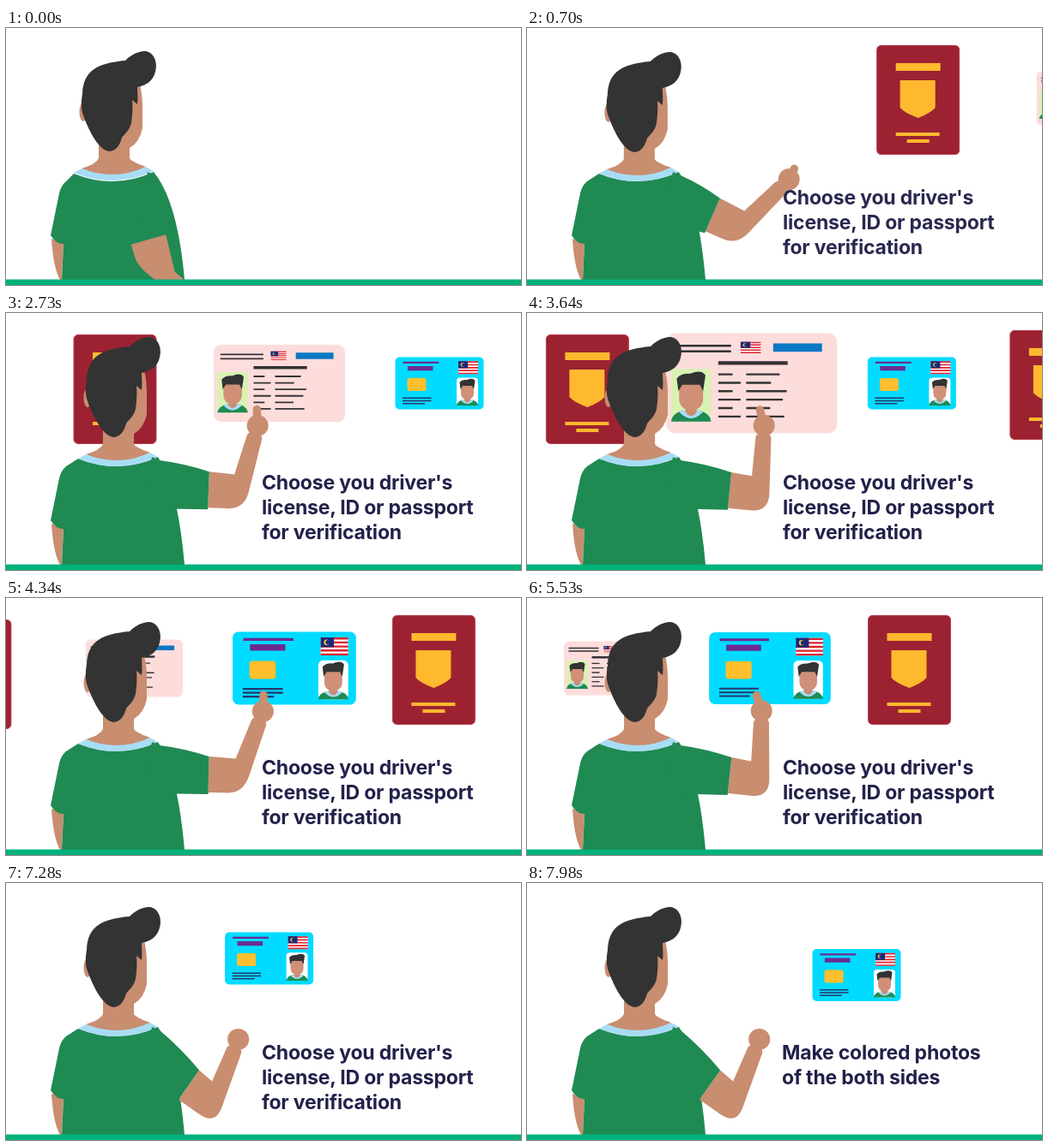
These frames come from a looping animation (600x300 px, 8 s). An HTML page:

```html
<!DOCTYPE html>
<html lang="en">
<head>
<meta charset="utf-8">
<style>
  html, body { margin: 0; width: 100%; height: 100%; overflow: hidden; background: #fff; }
  svg { display: block; width: 600px; height: 300px; }
  text { font: 700 23px Inter, "Open Sans", sans-serif; letter-spacing: -.2px; fill: #22214a; }
</style>
</head>
<body>
<svg viewBox="0 0 600 300">
  <defs>
    <g id="flag">
      <path fill="#fff" d="M0 0H23V15H0Z"/>
      <path stroke="#e0202f" stroke-width="23" stroke-dasharray="1.67" d="M11.5 0V15"/>
      <path fill="#1a2a78" d="M0 0H11V8H0Z"/>
      <circle cx="5" cy="4" r="2.3" fill="#ffd23c"/>
      <circle cx="6" cy="4" r="1.9" fill="#1a2a78"/>
    </g>
    <g id="avatar">
      <path fill="#208a53" d="M0 33Q1 27 9 26H16Q24 27 25 33Z"/>
      <path fill="#a8dcf5" d="M5 27L9 25.5H16L20 27Q12.5 35 5 27Z"/>
      <path fill="#c98d70" d="M9 21H16V27Q12.5 32 9 27Z"/>
      <rect x="5" y="7" width="15" height="19" rx="7" fill="#d28f78"/>
      <path fill="#333" d="M4.5 14L3.5 6Q6 2.500 12 3Q19 0 21.500 4L20 14L18 10H7Z"/>
    </g>
    <g id="passport">
      <rect x="-48" y="-63.500" width="96" height="127" rx="5" fill="#9c2232" stroke="#b5404c"/>
      <path fill="#ffb92e" d="M-26-43H26V-34H-26ZM-21-23H20V9Q15 15 0 21Q-16 15-21 9ZM-26 38H25V42H-26ZM-13 46H13V50H-13Z"/>
    </g>
    <g id="license">
      <rect x="-53.500" y="-31.500" width="107" height="63" rx="6" fill="#fddcdc"/>
      <path stroke="#333" stroke-width="1.300" d="M-48-23.500H-13M-48-20H-13"/>
      <path stroke="#333" stroke-width="2.400" d="M-21-12.700H22.500"/>
      <path id="rows" stroke="#333" stroke-width="1.300"/>
      <path fill="#0a78c2" d="M13.400-25H44V-19.700H13.400Z"/>
      <use href="#flag" transform="translate(-7 -26) scale(.55 .48)"/>
      <path fill="#d9f2b4" d="M-50.500-9H-25.500V24H-50.500Z"/>
      <use href="#avatar" x="-50.500" y="-9"/>
    </g>
    <g id="idcard">
      <rect x="-51.500" y="-30.500" width="103" height="61" rx="5" fill="#00dbff"/>
      <path fill="#6b2c91" d="M-42.500-25.200H-.7V-23H-42.500ZM-37-20H-7.500V-14.700H-37Z"/>
      <rect x="-37.500" y="-6" width="22" height="15" rx="2.500" fill="#ffbf2e"/>
      <path stroke="#26376b" stroke-width="1.500" d="M-43 17.300H-9.500M-43 20.500H-9.500M-43 23.700H-17"/>
      <use href="#flag" x="22" y="-25.700"/>
      <rect x="20" y="-6.600" width="25" height="32.500" rx="4" fill="#fff"/>
      <use href="#avatar" x="20" y="-7"/>
    </g>
  </defs>

  <use id="passport1" href="#passport"/>
  <use id="license1" href="#license"/>
  <use id="id1" href="#idcard"/>
  <use id="passport2" href="#passport"/>

  <path fill="#c98d70" d="M53 246L67 250L65 294H63Q55 280 53 246Z"/>
  <path id="torso" fill="#208a53"/>
  <g id="head">
    <path fill="#c98d70" d="M113 130V153Q110 160 93 165Q131 182 168 163Q151 157 149 153V130Z"/>
    <path fill="#a8dcf5" d="M84 170L93 165Q131 180 168 163L177 168Q131 189 84 170Z"/>
    <ellipse cx="95" cy="99" rx="4.500" ry="11" fill="#c98d70"/>
    <path fill="#c98d70" d="M120 60H158Q164.500 72 164 100V118Q161 134 149 141H118Z"/>
    <path fill="#333" d="M94 78C95 50 112 42 144 39C150 33 158 28 167 28C178 29 182 42 179 52C177 61 170 68 158 70
      C158 76 159 82 158 90L152 85C153 95 152 105 151 112C149 121 141 127 140 129C138 136 134 145 125 145
      C112 143 100 118 94 100C92 92 93 84 94 78Z"/>
  </g>
  <path id="skin" fill="#c98d70"/>
  <circle id="fist" r="12.500" fill="#c98d70"/>
  <path id="finger" stroke="#c98d70" stroke-width="9.500" stroke-linecap="round"/>
  <path id="sleeve" fill="#208a53"/>
  <path fill="#00b17c" d="M0 293.500H600V300H0Z"/>

  <g id="choose">
    <text x="298" y="206">Choose you driver's</text>
    <text x="298" y="235">license, ID or passport</text>
    <text x="298" y="264">for verification</text>
  </g>
  <g id="photos">
    <text x="297" y="206">Make colored photos</text>
    <text x="297" y="235">of the both sides</text>
  </g>
</svg>
<script>
const LOOP = 8000;
const $ = id => document.getElementById(id);
const set = (id, name, value) => $(id).setAttribute(name, value);
const mix = (a, b, p) => a.map((v, i) => v + (b[i] - v) * p);

// 0 to 1 between two times, eased in and out.
function ease(t, start, end) {
  const p = Math.min(1, Math.max(0, (t - start) / (end - start)));
  return (1 - Math.cos(Math.PI * p)) / 2;
}

// Scale of a card that grows, holds and shrinks back.
const pulse = (t, grow, shrink, extra) =>
  1 + extra * (ease(t, grow, grow + 760) - ease(t, shrink, shrink + 760));

// Arm pose: cuff centre x and y, upper arm angle, forearm angle, finger extension.
const DOWN = [165, 247, 74, 38, 0];
const TAP = [236, 208, 4, -78, 1];
const REACH = [236, 207, 1, -70, 1];
const SWIPE = [236, 208, 6, -89, 1];
const FIST = [212.5, 236.5, 35, -69, 0];
const MOVES = [
  [70, 1050, TAP], [1650, 2500, REACH], [2500, 3200, SWIPE],
  [3450, 4330, REACH], [4330, 5000, SWIPE], [5720, 6450, FIST]
];

const along = ([x, y], degrees, distance) => {
  const a = degrees * Math.PI / 180;
  return [x + Math.cos(a) * distance, y + Math.sin(a) * distance];
};

// Where the edges of upper arm and forearm meet, on the inner (1) or outer (-1) side.
function corner(elbow, upper, fore, side) {
  const halfUpper = 20 * side, halfFore = 11 * side;
  const c = Math.cos((upper - fore) * Math.PI / 180), d = 1 - c * c;
  return along(along(elbow, upper - 90, (halfUpper - c * halfFore) / d), fore - 90, (halfFore - c * halfUpper) / d);
}

function drawArm([x, y, upper, fore, point], lean) {
  const cuff = [x, y], elbow = along(cuff, upper, 36), hand = along(elbow, fore, 80);
  const top = along(cuff, upper - 90, 22), bottom = along(cuff, upper + 90, 22);
  const skinBottom = along(cuff, upper + 90, 20);
  const inner = corner(elbow, upper, fore, 1), outer = corner(elbow, upper, fore, -1);
  const wrist = along(hand, fore, -13);
  const left = along(wrist, fore - 90, 9), right = along(wrist, fore + 90, 9);
  const shoulder = [179 + lean, 172];
  const bulge = along(mix(shoulder, top, .5), upper - 90, 3);
  set('sleeve', 'd', `M${170 + lean} 168L${shoulder}Q${bulge} ${top}L${bottom}L160 228Z`);
  set('skin', 'd', `M${top}L${inner}L${left}L${hand}L${right}L${mix(right, outer, .75)}Q${outer} ${mix(skinBottom, outer, .55)}L${skinBottom}Z`);
  set('fist', 'cx', hand[0]);
  set('fist', 'cy', hand[1]);
  set('finger', 'd', `M${hand}L${along(hand, fore - 18, 19 * point)}`);
}

function place(id, x, y, scale, opacity = 1) {
  set(id, 'transform', `translate(${x} ${y}) scale(${scale})`);
  set(id, 'opacity', opacity);
}

function draw(t) {
  const shift = 760 - 388.5 * ease(t, 150, 1200) - 199.5 * ease(t, 1665, 3265) - 172 * ease(t, 3465, 4865);
  const others = 1 - ease(t, 6600, 7200);
  const move = ease(t, 6960, 7960);
  place('passport1', shift - 95, 84 + 5 * ease(t, 700, 1300), pulse(t, 700, 1750, .24));
  place('license1', shift + 96.5, 82, pulse(t, 2350, 3710, .86), others);
  place('id1', shift + 283 + 101 * move, 82 + 25.5 * move, pulse(t, 3980, 5120, .86));
  place('passport2', shift + 445.5, 84, 1, others);

  const lean = 5 * ease(t, 0, 800) - 5;
  place('head', lean, lean / 5, 1);
  set('torso', 'd', `M${84 + lean} 170Q${131 + lean} 189 ${177 + lean} 168Q200 202 208 294H65L67 252Q58 252 52 242L62 193Q64 184 70 179Z`);
  drawArm(MOVES.reduce((pose, [start, end, next]) => mix(pose, next, ease(t, start, end)), DOWN), lean);

  set('choose', 'opacity', ease(t, 350, 750) - ease(t, 7400, 7700));
  set('photos', 'opacity', ease(t, 7660, 7930));
}

let rows = '';
for (let i = 0; i < 6; i++) {
  const y = -5.6 + 5.3 * i;
  rows += `M-21 ${y}h${9 + i % 2 * 5}M-3.5 ${y}h${21 + 6 * Math.sin(4.3 * i)}`;
}
set('rows', 'd', rows);

function frame() {
  draw(performance.now() % LOOP);
  requestAnimationFrame(frame);
}
frame();
</script>
</body>
</html>
```
